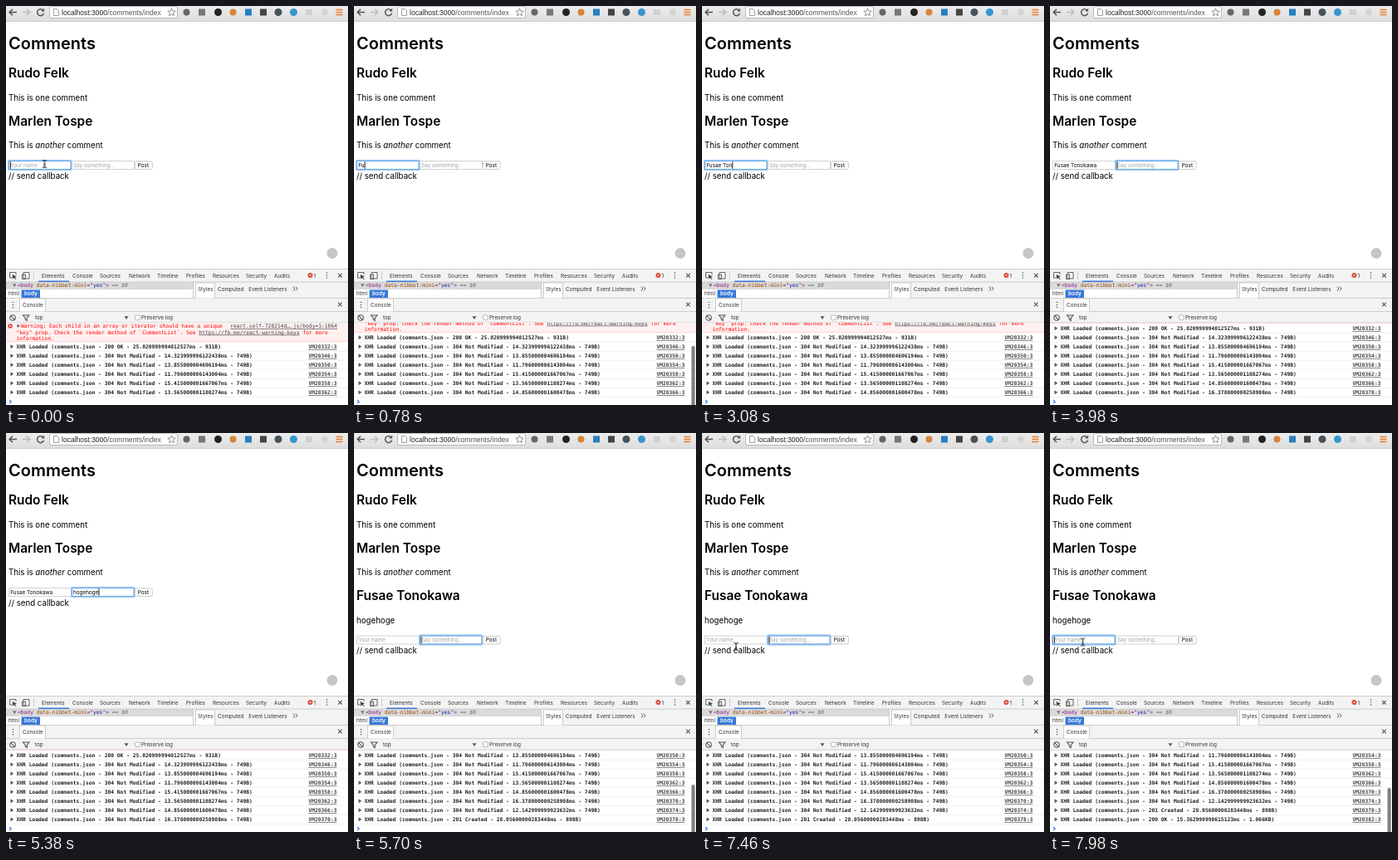
An HTML page that plays this animation: 412 by 480 pixels, repeating every 8 s.

```html
<!DOCTYPE html>
<html lang="en">
<head>
<meta charset="utf-8">
<title>Comments</title>
<style>
html, body { margin: 0; width: 100%; height: 100%; overflow: hidden; background: #fff; }
svg { display: block; width: 412px; height: 480px; }
text { white-space: pre; }
.page { font: 9.7px Inter, sans-serif; }
.page .h1 { font-size: 20px; font-weight: 600; }
.page .h2 { font-size: 15.4px; font-weight: 600; }
.ui { font: 6.4px Inter, sans-serif; fill: #333; }
.mono { font: 6.3px "DejaVu Sans Mono", monospace; }
.row { font-weight: 700; fill: #222; }
.link { font-weight: 700; fill: #444; text-decoration: underline; text-anchor: end; }
.line { stroke: #ccc; fill: none; }
.icon { stroke: #555; fill: none; stroke-width: 1.1; }
.thin { stroke-width: .9; }
.hint { fill: #a2a2a2; }
.typed { fill: #000; }
.ring rect { fill: none; }

#log, #form, #added, #nameRing, #sayRing, #thumb, #pointer { animation: 8s step-end infinite; }
#log { animation-name: log; }
#form { animation-name: form; }
#added { animation-name: added; }
#nameRing { animation-name: nameRing; }
#sayRing { animation-name: sayRing; }
#thumb { animation-name: grow; }
#pointer { animation-name: show; }
#bar { animation: fade 8s linear infinite; }
#path { animation: move 8s ease-in-out infinite; }

@keyframes log {
  0% { transform: translateY(0); }
  9.5% { transform: translateY(-11px); }
  39% { transform: translateY(-22px); }
  68.5% { transform: translateY(-33px); }
  70.75% { transform: translateY(-44px); }
  98.75%, 100% { transform: translateY(-55px); }
}
@keyframes grow {
  0% { transform: translateY(409px); }
  39% { transform: translateY(414px); }
  68.5% { transform: translateY(419px); }
  70.75% { transform: translateY(423px); }
  98.75%, 100% { transform: translateY(427px); }
}
@keyframes fade {
  0%, 9.49% { opacity: 0; }
  9.5%, 16% { opacity: 1; }
  20%, 38.99% { opacity: 0; }
  39%, 45.75% { opacity: 1; }
  49.75%, 68.49% { opacity: 0; }
  68.5%, 78.25% { opacity: 1; }
  82.25%, 98.74% { opacity: 0; }
  98.75%, 100% { opacity: 1; }
}
@keyframes form {
  0% { transform: translateY(0); }
  68.25%, 100% { transform: translateY(57.5px); }
}
@keyframes added {
  0% { visibility: hidden; }
  68.25%, 100% { visibility: visible; }
}
@keyframes nameRing {
  0% { visibility: visible; }
  49.75% { visibility: hidden; }
  98.75%, 100% { visibility: visible; }
}
@keyframes sayRing {
  0% { visibility: hidden; }
  49.75% { visibility: visible; }
  98.75%, 100% { visibility: hidden; }
}
@keyframes show {
  0% { visibility: visible; }
  5.25% { visibility: hidden; }
  85.75%, 100% { visibility: visible; }
}
@keyframes move {
  0%, 85.75% { transform: translate(46.5px, 190px); }
  89% { transform: translate(40px, 220px); }
  93.25%, 95% { transform: translate(41px, 257px); }
  95.75% { transform: translate(43px, 258px); }
  96.75%, 100% { transform: translate(39.5px, 251.5px); }
}
</style>
</head>
<body>
<svg viewBox="0 0 412 480">
  <defs>
    <linearGradient id="chrome" x2="0" y2="1">
      <stop stop-color="#ececec"/><stop offset="1" stop-color="#dedede"/>
    </linearGradient>
    <clipPath id="view"><rect y="381.5" width="412" height="89.3"/></clipPath>
    <g id="dots" fill="#555"><circle cy="-3" r=".8"/><circle r=".8"/><circle cy="3" r=".8"/></g>
    <path id="cross" class="icon" d="M-2.3-2.3 2.3 2.3M2.3-2.3-2.3 2.3"/>
    <g id="ring" class="ring">
      <rect x="-.5" y="-.5" width="76" height="11.5" rx="1.5" stroke="#a9cff5" stroke-width="2"/>
      <rect x=".3" y=".3" width="74.4" height="9.9" stroke="#66a6e6"/>
    </g>
  </defs>

  <!-- browser bar -->
  <rect width="412" height="18" fill="url(#chrome)"/>
  <path class="line" d="M0 18.5H412" stroke="#b4b4b4"/>
  <path class="icon" d="M13 7.5H4.5M8 3.7 4.2 7.5 8 11.3" style="stroke-width:1.6"/>
  <path class="icon" d="M20 7.5H28.5M25 3.7 28.8 7.5 25 11.3" style="stroke:#bbb;stroke-width:1.6"/>
  <path class="icon" d="M44.8 5.2A4 4 0 1 0 45.5 8.6" style="stroke-width:1.5"/>
  <path d="M46.1 2.8V6.6H42.3Z" fill="#555"/>
  <rect x="52.5" y=".5" width="154" height="14" rx="2" fill="#fff" stroke="#b8b8b8"/>
  <path d="M57.5 3.5H61.5L63.5 5.5V11.5H57.5Z" fill="#fff" stroke="#888" stroke-width=".8"/>
  <text x="67" y="10.9" font-family="Liberation Sans, sans-serif" font-size="8.55" fill="#222">localhost:3000<tspan fill="#555">/comments/index</tspan></text>
  <path d="M199.5 2.8l1.3 3.1 3.4.3-2.6 2.2.8 3.3-2.9-1.8-2.9 1.8.8-3.3-2.6-2.2 3.4-.3Z" fill="none" stroke="#777" stroke-width=".8"/>
  <circle cx="217.5" cy="7.5" r="4" fill="#666"/>
  <rect x="232" y="3.5" width="8" height="8" fill="#777"/>
  <circle cx="255.5" cy="7.5" r="4.5" fill="#222"/>
  <circle cx="273.5" cy="7.5" r="4" fill="#d78339"/>
  <rect x="288" y="3.5" width="8" height="8" fill="#287fc0"/>
  <rect x="306" y="3.5" width="8" height="8" fill="#444"/>
  <circle cx="328" cy="7.5" r="4.5" fill="#47535a"/>
  <circle cx="346.5" cy="7.5" r="4.5" fill="#3795cf"/>
  <rect x="361" y="4" width="8" height="7" fill="#d0d0d0"/>
  <circle cx="384" cy="7.5" r="4" fill="#d4d4d4"/>
  <path class="icon" d="M397.5 4.5H405.5M397.5 7.5H405.5M397.5 10.5H405.5" style="stroke:#e87b2c;stroke-width:1.6"/>

  <!-- page -->
  <g class="page">
    <text class="h1" x="3" y="51.8">Comments</text>
    <text class="h2" x="3" y="86.3">Rudo Felk</text>
    <text x="3" y="113.5">This is one comment</text>
    <text class="h2" x="3" y="143.8">Marlen Tospe</text>
    <text x="3" y="171">This is <tspan font-style="italic">another</tspan> comment</text>
    <g id="added">
      <text class="h2" x="3" y="201.3">Fusae Tonokawa</text>
      <text x="3" y="228.5">hogehoge</text>
    </g>
    <g id="form">
      <text x="3" y="207.8">// send callback</text>
      <g class="ui">
        <path d="M3.5 186.5H78.5V196.5H3.5ZM79.5 186.5H154.5V196.5H79.5Z" fill="#fff" stroke="#d2d2d2"/>
        <use id="nameRing" href="#ring" x="3.3" y="186.2"/>
        <use id="sayRing" href="#ring" x="79.3" y="186.2"/>
        <text id="name" x="5.3" y="193.9"></text>
        <text id="say" x="81" y="193.9"></text>
        <rect id="caret" y="187.3" width=".9" height="8.4" fill="#000"/>
        <rect x="155.3" y="186.8" width="21" height="9.6" rx="2" fill="#fff" stroke="#bbb" stroke-width=".8"/>
        <text x="158.7" y="193.9" fill="#000">Post</text>
      </g>
    </g>
  </g>
  <circle cx="393" cy="297.5" r="6.5" fill="#c6c6c6"/>

  <!-- developer tools -->
  <rect y="316" width="412" height="65" fill="#f3f3f3"/>
  <rect y="332" width="225" height="9" fill="#dadada"/>
  <rect y="341" width="225" height="10" fill="#fff"/>
  <path class="line" d="M0 316.5H412M0 332H412M0 351.5H412M0 367.5H412M0 381H412M225.5 332V351M33.5 319V329"/>
  <g class="ui">
    <path class="icon thin" d="M8 327H4.5V320.5H12V323"/>
    <path d="M7.5 323 13 325.5 10.8 326.3 12.5 328.5 11.5 329 10 327 8.5 328.5Z" fill="#444"/>
    <path class="icon thin" d="M21 320.5H28V328H21ZM19.5 323H23.5V328.5H19.5Z"/>
    <g id="tabs"></g>
    <rect x="39" y="330.5" width="37" height="1.5" fill="#3b79d8"/>
    <circle cx="366.5" cy="324" r="3" fill="#d9483b"/>
    <path d="M365.3 322.8l2.4 2.4m0-2.4-2.4 2.4" stroke="#fff" stroke-width=".7"/>
    <text x="370.5" y="326.6">1</text>
    <use href="#dots" x="386.5" y="324"/>
    <use href="#cross" x="402.5" y="324.2"/>

    <path d="M8 334.3H12.5L10.25 338.2Z" fill="#777"/>
    <text class="mono" x="14" y="338.3" fill="#881280">&lt;body <tspan fill="#994500">data-nibbet-mini</tspan>="<tspan fill="#1a1aa6">yes</tspan>"&gt;<tspan fill="#666"> == <tspan font-style="italic">$0</tspan></tspan></text>
    <rect x="18.5" y="341.5" width="22.5" height="9.5" fill="#3879d9"/>
    <text x="3" y="348.4">html</text>
    <text x="22" y="348.4" style="fill:#fff;font-weight:600">body</text>
    <path d="M228.5 351.5V333H251.5V351.5" fill="#fff" stroke="#ccc"/>
    <text x="231" y="343.3">Styles</text>
    <text x="255" y="343.3">Computed</text>
    <text x="292.3" y="343.3">Event Listeners</text>
    <path class="icon thin" d="M346 337.5 348 340 346 342.5M349 337.5 351 340 349 342.5"/>

    <use href="#dots" x="8.5" y="359.5"/>
    <path d="M16.5 367.5V352H47.5V367.5" fill="#fff" stroke="#ccc"/>
    <text x="20" y="361.9">Console</text>
    <use href="#cross" x="402.5" y="359"/>
    <circle class="icon" cx="8" cy="375" r="3.3"/>
    <path class="icon" d="M5.7 372.7 10.3 377.3"/>
    <path class="icon" d="M20.5 372H28L25.2 375.5V378.5L23.3 377.3V375.5Z"/>
    <text x="35" y="377.3">top</text>
    <path d="M142.5 373.3H147.5L145 377Z" fill="#555"/>
    <rect x="155.5" y="372" width="5.6" height="5.6" rx="1" fill="#fff" stroke="#aaa" stroke-width=".8"/>
    <text x="163" y="377.3">Preserve log</text>
  </g>

  <!-- console -->
  <g class="mono" clip-path="url(#view)">
    <g id="log">
      <rect y="376" width="412" height="27.5" fill="#fff0f0"/>
      <path d="M0 403.5H412" stroke="#ffd6d6"/>
      <circle cx="5" cy="385" r="2.8" fill="#d9483b"/>
      <path d="M3.9 383.9l2.2 2.2m0-2.2-2.2 2.2" stroke="#fff" stroke-width=".7"/>
      <path d="M13.5 382.5V387L17 384.75Z" fill="#666"/>
      <g fill="#f00">
        <text x="18" y="387">Warning: Each child in an array or iterator should have a unique</text>
        <text x="12.5" y="394.6">"key" prop. Check the render method of `CommentList`. See <tspan fill="#444" text-decoration="underline">https://fb.me/react-warning-keys</tspan> for more</text>
        <text x="12.5" y="402.2">information.</text>
      </g>
      <text x="399" y="387" text-anchor="end" fill="#444" text-decoration="underline">react.self-728214d….js/body=1:1064</text>
    </g>
  </g>
  <path d="M4 473.8 6.2 476 4 478.2" fill="none" stroke="#3a6fe0" stroke-width="1.2"/>
  <g id="bar"><rect id="thumb" x="406.5" width="4.2" height="80" rx="2.1" fill="#808080"/></g>

  <g id="pointer"><g id="path">
    <path d="M-2.5-4.5Q0-4.5 0-3Q0-4.5 2.5-4.5M0-3V3M-2.5 4.5Q0 4.5 0 3Q0 4.5 2.5 4.5M-1 1H1" fill="none" stroke="#111"/>
  </g></g>
</svg>
<script>
const $ = id => document.getElementById(id);
const make = (parent, tag, attrs, text = "") => {
  const el = document.createElementNS("http://www.w3.org/2000/svg", tag);
  for (const key in attrs) el.setAttribute(key, attrs[key]);
  el.textContent = text;
  parent.append(el);
};

const tabs = { Elements: 43, Console: 80, Sources: 113, Network: 148, Timeline: 182,
  Profiles: 217, Resources: 249, Security: 289, Audits: 323 };
for (const label in tabs) make($("tabs"), "text", { x: tabs[label], y: 326.6 }, label);

const same = "304 Not Modified";
const requests = [
  [20332, "200 OK", "25.020999994012527", "931B"],
  [20346, same, "14.323999996122438"],
  [20350, same, "13.855000004696194"],
  [20354, same, "11.796000006143004"],
  [20358, same, "15.415000001667067"],
  [20362, same, "13.565000001108274"],
  [20366, same, "14.856000001600478"],
  [20370, same, "16.378000000258908"],
  [20374, same, "12.142999999923632"],
  [20378, "201 Created", "28.05600000283448", "898B"],
  [20382, "200 OK", "15.362999998615123", "1.066KB"]
];
requests.forEach(([id, status, ms, size = "749B"], i) => {
  const y = 409.8 + 11 * i, log = $("log");
  make(log, "path", { d: `M0 ${y + 5.5}H412`, stroke: "#f0f0f0" });
  make(log, "path", { d: `M5.5 ${y - 2.5}v5l3.7-2.5Z`, fill: "#555" });
  make(log, "text", { class: "row", x: 12.5, y: y + 2.2 },
    `XHR Loaded (comments.json - ${status} - ${ms}ms - ${size})`);
  make(log, "text", { class: "link", x: 398.5, y: y + 2.2 }, `VM${id}:3`);
});

// Each field: time of every keystroke, then the time it is cleared.
const fields = {
  name: { hint: "Your name", text: "Fusae Tonokawa", clear: 5460,
    keys: [420, 720, 1180, 1540, 1600, 2400, 2800, 2960, 3080, 3200, 3320, 3440, 3560, 3700] },
  say: { hint: "Say something...", text: "hogehoge", clear: 5460,
    keys: [4780, 4860, 5000, 5060, 5200, 5260, 5320, 5380] }
};
const valueAt = (f, t) => t >= f.clear ? "" : f.text.slice(0, f.keys.filter(k => k <= t).length);
const resets = [0, 3980, 5460, 7900, ...fields.name.keys, ...fields.say.keys];
const clock = $("path").getAnimations()[0];
const lead = 17; // prepare the frame about to be shown

function draw() {
  const t = ((clock.currentTime || 0) + lead) % 8000;
  for (const id in fields) {
    const el = $(id), value = valueAt(fields[id], t);
    el.textContent = value || fields[id].hint;
    el.setAttribute("class", value ? "typed" : "hint");
  }
  const active = t >= 3980 && t < 7900 ? "say" : "name";
  const el = $(active), value = valueAt(fields[active], t);
  const width = value ? el.getSubStringLength(0, value.length) : -0.4;
  const last = Math.max(...resets.filter(r => r <= t));
  $("caret").setAttribute("x", +el.getAttribute("x") + width);
  $("caret").setAttribute("visibility", (t - last) % 1000 < 500 ? "visible" : "hidden");
  requestAnimationFrame(draw);
}
draw();
</script>
</body>
</html>
```
